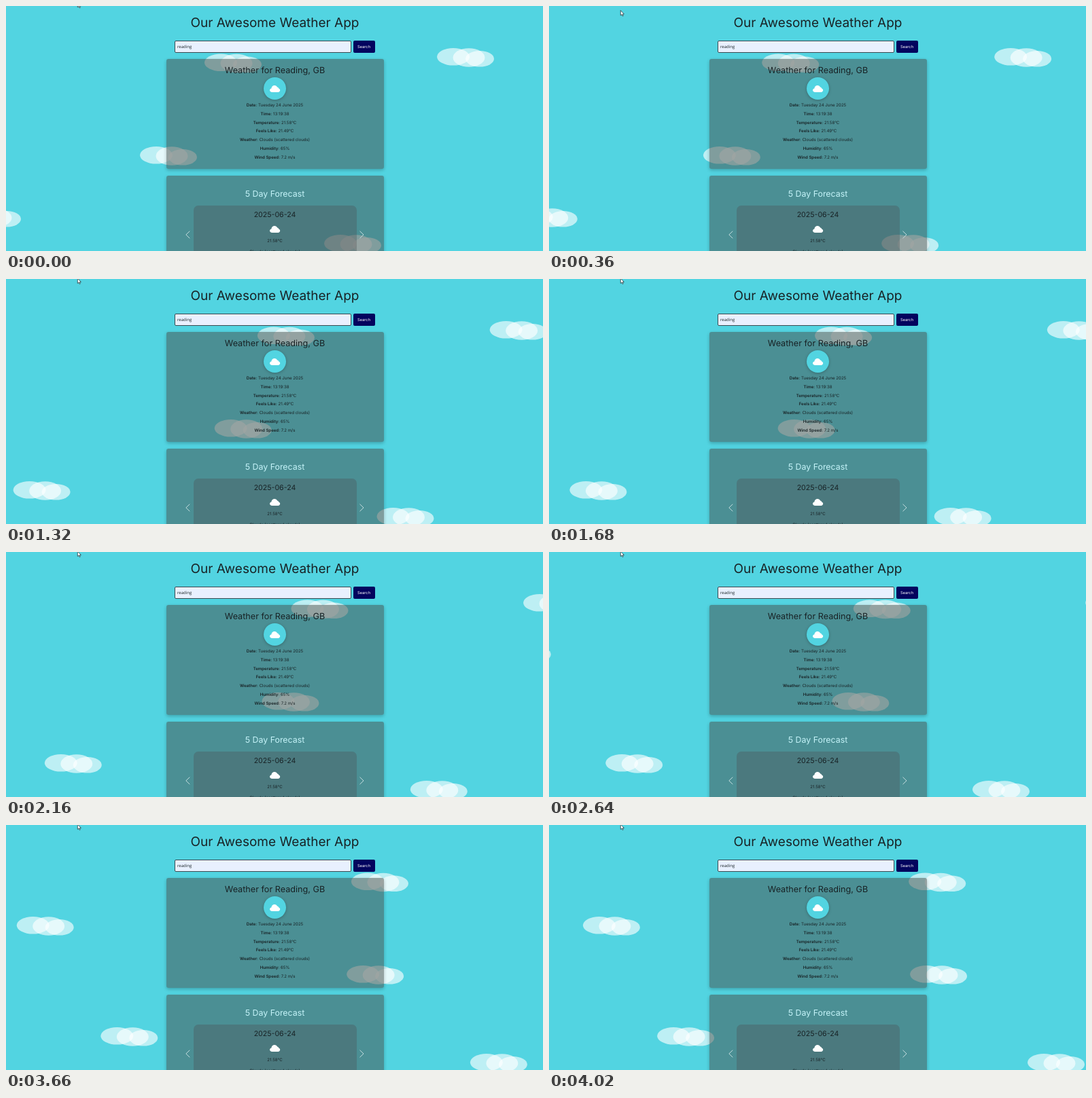
Write an HTML page with a canvas that moves like this. It is 790 px wide and 361 px high and loops after 4.08 s.

```html
<!DOCTYPE html>
<html lang="en">
<head>
<meta charset="utf-8">
<title>Weather App</title>
<style>
  html, body { margin: 0; width: 790px; height: 361px; overflow: hidden; background: #52d4e1; }
  body { position: relative; }
  canvas, svg, div { position: absolute; left: 0; top: 0; box-sizing: border-box; }
  .card {
    left: 235.5px; width: 320px; border-radius: 3px;
    background: rgba(68, 76, 73, .5); box-shadow: 0 2px 5px rgba(0, 0, 0, .24);
  }
  .now { top: 78px; height: 162px; }
  .week { top: 250px; height: 130px; }
  .day { left: 275.5px; top: 294px; width: 240.5px; height: 90px; border-radius: 7px; background: rgba(75, 80, 84, .34); }
  .field { left: 248px; top: 51px; width: 260px; height: 17.5px; border: 1px solid #3b4a50; border-radius: 2px; background: #e8f0fe; }
  .button { left: 510.5px; top: 51px; width: 32px; height: 17.5px; border-radius: 2px; background: #03045e; }
  .badge { left: 379px; top: 105px; width: 33px; height: 33px; border-radius: 50%; background: #52d4e1; box-shadow: 0 1px 4px rgba(0, 0, 0, .26); }
  text { font-family: Inter, Roboto, sans-serif; text-rendering: geometricPrecision; fill: #182225; text-anchor: middle; }
  .small { font-size: 6.1px; }
  .small tspan { font-weight: 600; }
</style>
</head>
<body>
<canvas id="sky" width="790" height="361"></canvas>
<div class="card now"></div>
<div class="card week"></div>
<div class="day"></div>
<div class="field"></div>
<div class="button"></div>
<div class="badge"></div>
<svg width="790" height="361" viewBox="0 0 790 361">
  <defs>
    <path id="cloud" fill="#fff" d="M3.4 10C1.5 10 0 8.8 0 7.1C0 5.7 1 4.6 2.4 4.4C2.7 1.8 4.5 0 7 0C9 0 10.5 1.1 11.2 2.8C12 2.7 12.9 3.3 13.1 4.4C14.3 4.7 15.2 5.8 15.2 7.1C15.2 8.8 13.9 10 12.2 10Z"/>
  </defs>
  <text x="395.5" y="30.8" font-size="19">Our Awesome Weather App</text>
  <text x="252" y="62.2" font-size="6" style="font-family:'Open Sans','Noto Sans',sans-serif;text-anchor:start">reading</text>
  <text x="526.5" y="62.2" font-size="5.8" style="fill:#fff">Search</text>
  <text x="395.5" y="99.4" font-size="12.65">Weather for Reading, GB</text>
  <use href="#cloud" x="388" y="117"/>
  <g id="facts"></g>
  <text x="395.5" y="280.8" font-size="12.4" style="fill:#c4f3f8">5 Day Forecast</text>
  <text x="395.5" y="311" font-size="10.6">2025-06-24</text>
  <use href="#cloud" x="388" y="324"/>
  <text class="small" x="395.5" y="348.1">21.58°C</text>
  <text class="small" x="395.5" y="363.6">Clouds (scattered clouds)</text>
  <path d="M270 332L264.8 337L270 342M520.8 332L526 337L520.8 342" fill="none" stroke="#c3dcde" stroke-width="1" stroke-linecap="round" stroke-linejoin="round"/>
  <path id="pointer" d="M0 0V7.4L1.7 5.9L2.8 8.4L4 7.9L2.9 5.4H5.1Z" fill="#fff" stroke="#16262a" stroke-width=".7"/>
</svg>
<script>
const LOOP = 4080, STEP = 60;
const ctx = document.getElementById('sky').getContext('2d');
const pointer = document.getElementById('pointer');

const facts = [
  ['Date', 'Tuesday 24 June 2025'],
  ['Time', '13:19:38'],
  ['Temperature', '21.58°C'],
  ['Feels Like', '21.49°C'],
  ['Weather', 'Clouds (scattered clouds)'],
  ['Humidity', '65%'],
  ['Wind Speed', '7.2 m/s']
];
document.getElementById('facts').innerHTML = facts.map(([name, value], i) =>
  `<text class="small" x="395.5" y="${148.1 + i * 12.78}"><tspan>${name}:</tspan> ${value}</text>`
).join('');

// left edge at time 0, vertical centre, pixels per ms
const clouds = [
  [634, 76, .0588],
  [292, 84.5, .059],
  [197, 221, .0831],
  [-62, 312, .055],
  [468, 351, .0587],
  [-332, 149, .095]
];

// centre offset and radii of each puff
const puffs = [
  [24, -1.2, 24, 12.8],
  [47, 0, 23.5, 13.8],
  [63, 1.8, 21, 11.8]
];

function drawCloud(x, y) {
  for (const [dx, dy, rx, ry] of puffs) {
    ctx.beginPath();
    ctx.ellipse(x + dx, y + dy, rx, ry, 0, 0, Math.PI * 2);
    ctx.fill();
  }
}

function ease(t, from, to) {
  const k = Math.min(1, Math.max(0, (t - from) / (to - from)));
  return k * k * (3 - 2 * k);
}

function draw(t) {
  ctx.clearRect(0, 0, 790, 361);
  ctx.fillStyle = 'rgba(255,255,255,.62)';
  for (const [x, y, speed] of clouds) drawCloud(x + speed * t, y);
  const tip = -5.5 + 12 * ease(t, 0, 330) - 7.5 * ease(t, 420, 840);
  pointer.setAttribute('transform', `translate(105.3 ${tip})`);
}

const start = performance.now();
function tick() {
  const t = (performance.now() - start) % LOOP;
  draw(Math.floor(t / STEP) * STEP);
  requestAnimationFrame(tick);
}
draw(0);
requestAnimationFrame(tick);
</script>
</body>
</html>
```
